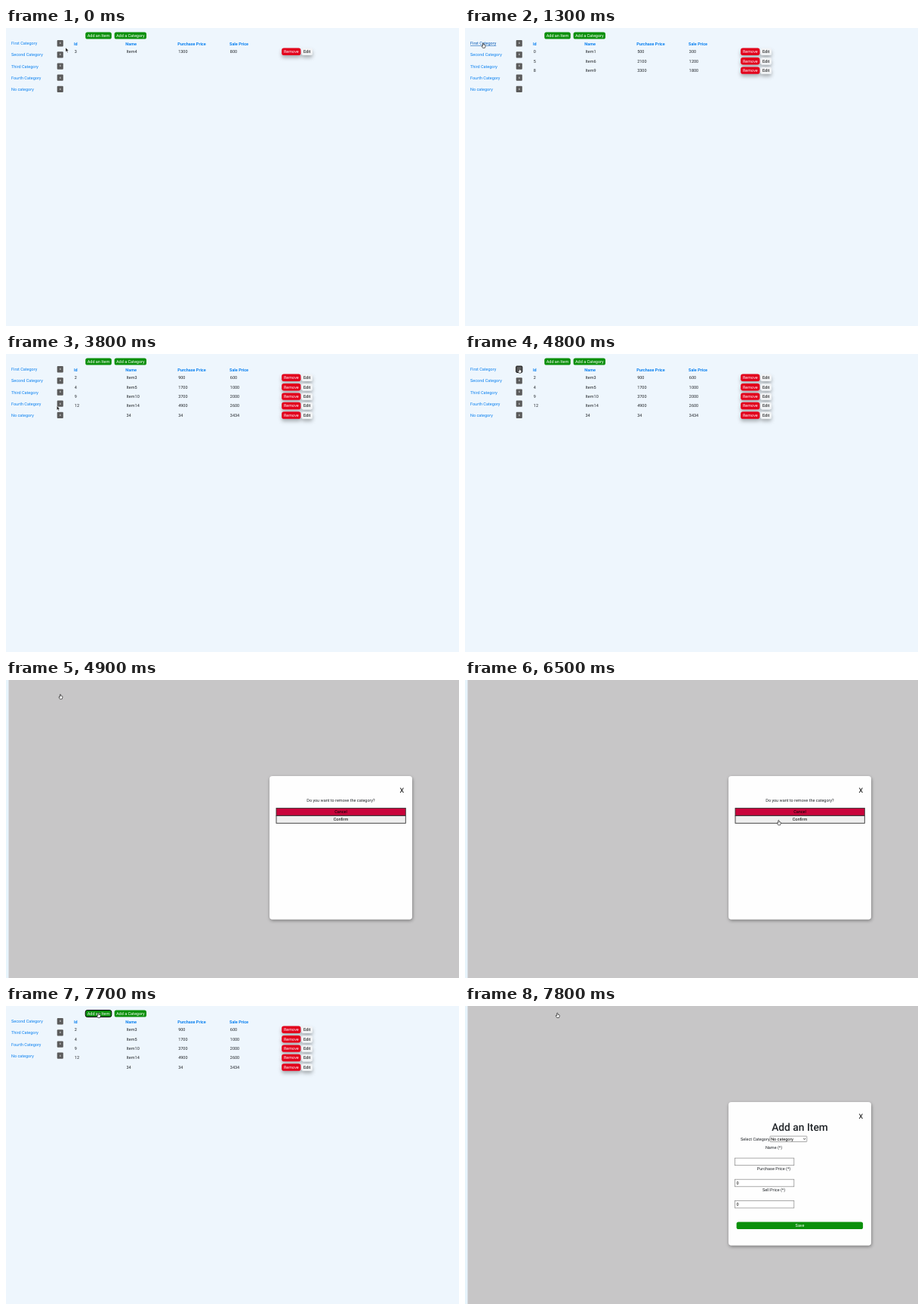
These frames come from a looping animation (600 by 394 pixels, 8 s). An HTML page:

```html
<!DOCTYPE html>
<html lang="en">
<head>
<meta charset="utf-8">
<title>Item manager</title>
<style>
  html, body { margin: 0; width: 100%; height: 100%; overflow: hidden; background: #eef6fd; }
  svg { display: block; width: 100%; height: 100%; }
  text { font: 5.5px Roboto, Arial, sans-serif; fill: #212529; text-rendering: geometricPrecision; }
  .link { fill: #0a80f0; }
  .hover { fill: #0056b3; text-decoration: underline; }
  .head { fill: #0a80f0; font-weight: 700; }
  .light { fill: #fff; }
  .black { fill: #000; }
  .close { fill: #000; font-size: 9px; }
  .title { font-size: 13.8px; font-weight: 500; }
  .tiny { fill: #fff; font-size: 4.4px; }
</style>
</head>
<body>
<svg viewBox="0 0 600 394">
  <defs>
    <filter id="lift" x="-40%" y="-80%" width="180%" height="350%">
      <feDropShadow dx="0" dy="3.2" stdDeviation="2.6" flood-color="#000" flood-opacity=".3"/>
    </filter>
    <filter id="card" x="-10%" y="-10%" width="120%" height="120%">
      <feDropShadow dx="0.6" dy="1.8" stdDeviation="2" flood-color="#000" flood-opacity=".38"/>
    </filter>
  </defs>
  <g id="scene"></g>
  <g id="pointer"></g>
</svg>
<script>
const LOOP = 8000, STEP = 100;
const GREEN = '#0b900b', RED = '#e2031c';
const scene = document.getElementById('scene');
const pointer = document.getElementById('pointer');

const categories = [['First Category', 34.5], ['Second Category', 41.5], ['Third Category', 36],
  ['Fourth Category', 39.5], ['No category', 30]];

// Table contents by start time; a row is id, name, purchase price, sale price
const tables = [
  [0, ['3,Item4,1300,800']],
  [1000, ['0,Item1,500,300', '5,Item6,2100,1200', '8,Item9,3300,1800']],
  [1900, ['1,Item2,700,400', '6,Item7,2500,1400', '7,Item8,2900,1600', '10,Item11,4100,2200']],
  [2700, ['2,Item3,900,600', '4,Item5,1700,1000', '9,Item10,3700,2000', '12,Item14,4900,2600', ',34,34,3434']]
];

// Pointer tip: time, x, y
const path = [
  [0, 79, 26], [800, 24, 18.3], [1200, 24, 18.3], [1700, 25, 33], [1900, 25, 34],
  [2300, 22, 48.5], [2500, 23.3, 50], [2700, 23.3, 50], [3500, 26, 64], [3900, 75, 69.5],
  [4400, 72.6, 21], [4500, 72, 18.7], [4900, 72, 18.7], [5600, 429, 172], [5800, 420, 177],
  [5900, 420, 177], [6400, 415.4, 185.3], [6700, 415.4, 185.3], [7600, 122.3, 9], [LOOP, 122.3, 9]
];

const text = (x, y, str, cls = '', anchor = 'start') =>
  `<text x="${x}" y="${y}" class="${cls}" text-anchor="${anchor}">${str}</text>`;
const rect = (x, y, w, h, fill, r = 0, extra = '') =>
  `<rect x="${x}" y="${y}" width="${w}" height="${h}" rx="${r}" fill="${fill}" ${extra}/>`;
const ring = (on, color = '#000') => on ? `stroke="${color}" stroke-width="1"` : '';
const inside = (p, x, y, w, h) => p.x >= x && p.x <= x + w && p.y >= y && p.y <= y + h;

function pointerAt(t) {
  let i = 1;
  while (path[i][0] < t) i++;
  const [t0, x0, y0] = path[i - 1], [t1, x1, y1] = path[i];
  const u = (t - t0) / (t1 - t0), k = u * u * (3 - 2 * u);
  return { x: x0 + (x1 - x0) * k, y: y0 + (y1 - y0) * k };
}

function sidebar(t, p) {
  const list = t < 6600 ? categories : categories.slice(1);
  return list.map(([name, width], i) => {
    const y = 20.2 + i * 15.15;
    const over = inside(p, 7, y - 4, width, 8);
    const focus = t === 4800 && i === 0;
    return text(7, y + 2, name, over ? 'hover' : 'link')
      + rect(67.7, y - 4.1, 8.1, 8.3, '#5b5b5b', 1, ring(focus, '#111'))
      + text(71.75, y + 0.9, 'x', 'tiny', 'middle');
  }).join('');
}

function topButtons(t) {
  return rect(105.2, 5.5, 34.6, 9, GREEN, 2.6, ring(t === 7700))
    + text(122.5, 12, 'Add an Item', 'light', 'middle')
    + rect(143.6, 5.5, 42.4, 9, GREEN, 2.6)
    + text(164.8, 12, 'Add a Category', 'light', 'middle');
}

function table(t) {
  const heads = ['Id', 'Name', 'Purchase Price', 'Sale Price'];
  const rows = tables.filter(entry => entry[0] <= t).pop()[1];
  const headX = [90, 158.3, 227.2, 296], cellX = [90.8, 159.5, 228.2, 296.8];
  return heads.map((h, i) => text(headX[i], 22.5, h, 'head')).join('')
    + rows.map((row, r) => {
      const y = 31.2 + r * 12.42;
      return row.split(',').map((cell, i) => text(cellX[i], y + 1.9, cell)).join('')
        + '<g filter="url(#lift)">' + rect(365.2, y - 4.6, 25.2, 9.4, RED, 2.8)
        + rect(391.6, y - 4.4, 14.4, 9.2, '#f1f3f5', 2.4) + '</g>'
        + text(377.8, y + 2, 'Remove', 'light', 'middle')
        + text(398.7, y + 1.9, 'Edit', 'black', 'middle');
    }).join('');
}

function modal(body) {
  return rect(0, 0, 3.5, 394, '#e7f4fc') + rect(3.5, 0, 596.5, 394, '#c7c6c7')
    + rect(349, 127, 189, 189.5, '#fefefe', 4, 'filter="url(#card)"')
    + text(524.3, 149, 'X', 'close', 'middle') + body;
}

function confirmBody() {
  const bar = (y, h, fill, label, base) =>
    rect(358, y, 171.3, h, fill, 0, 'stroke="#333" stroke-width=".9"')
    + text(443.5, base, label, 'black', 'middle');
  return text(443.5, 161, 'Do you want to remove the category?', '', 'middle')
    + bar(169.4, 9.8, '#c9043b', 'Cancel', 176.2)
    + bar(179.5, 9.8, '#efefef', 'Confirm', 186.3);
}

function formBody() {
  const border = 'stroke="#858585" stroke-width=".7"';
  const field = (y, label, value) => text(409, y, label, '', 'middle')
    + rect(357.6, y + 12.4, 78.2, 9.6, '#fff', 0, border)
    + text(359.4, y + 19.2, value, 'black');
  return text(443.5, 165.2, 'Add an Item', 'title', 'middle')
    + text(365, 177.6, 'Select Category')
    + rect(404, 172.1, 48.8, 7.4, '#fff', 0.5, border)
    + text(405.2, 177.7, 'No category', 'black')
    + '<path d="M448.2 175l1.4 1.5 1.4-1.5" fill="none" stroke="#222" stroke-width=".8"/>'
    + field(188.7, 'Name (*)', '') + field(216.8, 'Purchase Price (*)', '0')
    + field(245, 'Sell Price (*)', '0')
    + rect(359.6, 285.5, 167.5, 9.5, GREEN, 2.6)
    + text(443.5, 292.2, 'Save', 'light', 'middle');
}

function overTarget(t, p) {
  if (t >= 7800 || t === 4900) return true;
  if (t >= 4900 && t < 6600) return inside(p, 358, 169, 171.5, 21);
  const list = t < 6600 ? categories : categories.slice(1);
  return inside(p, 105, 5, 35, 10) || inside(p, 143.5, 5, 42.5, 10)
    || list.some(([, width], i) => {
      const y = 16.1 + i * 15.15;
      return inside(p, 7, y, width, 8.2) || inside(p, 67.5, y, 8.3, 8.3);
    });
}

const arrow = '<path d="M0 0V5.4L1.3 4.3 2.2 6.4 3.1 6 2.2 4H3.9Z" fill="#111" stroke="#fff" stroke-width=".4"/>';
const hand = '<path d="M-.6 .5Q0-.3 .6 .5V2.2L2.6 2.7Q3.1 3 2.9 4.2L2.2 6.5H-.6L-2 4.2Q-2.2 3.2-1.3 3.4L-.6 4Z"'
  + ' fill="#fff" stroke="#222" stroke-width=".7" stroke-linejoin="round"/>';

function render(t) {
  const p = pointerAt(t);
  if (t >= 7800) scene.innerHTML = modal(formBody());
  else if (t >= 4900 && t < 6600) scene.innerHTML = modal(confirmBody());
  else scene.innerHTML = topButtons(t) + sidebar(t, p) + table(t);
  pointer.setAttribute('transform', `translate(${p.x} ${p.y})`);
  pointer.innerHTML = overTarget(t, p) ? hand : arrow;
}

const start = performance.now();
let shown = -1;
function tick() {
  const elapsed = (performance.now() - start) % LOOP;
  const t = Math.floor(elapsed / STEP) * STEP;
  if (t !== shown) render(shown = t);
  requestAnimationFrame(tick);
}
tick();
</script>
</body>
</html>
```
